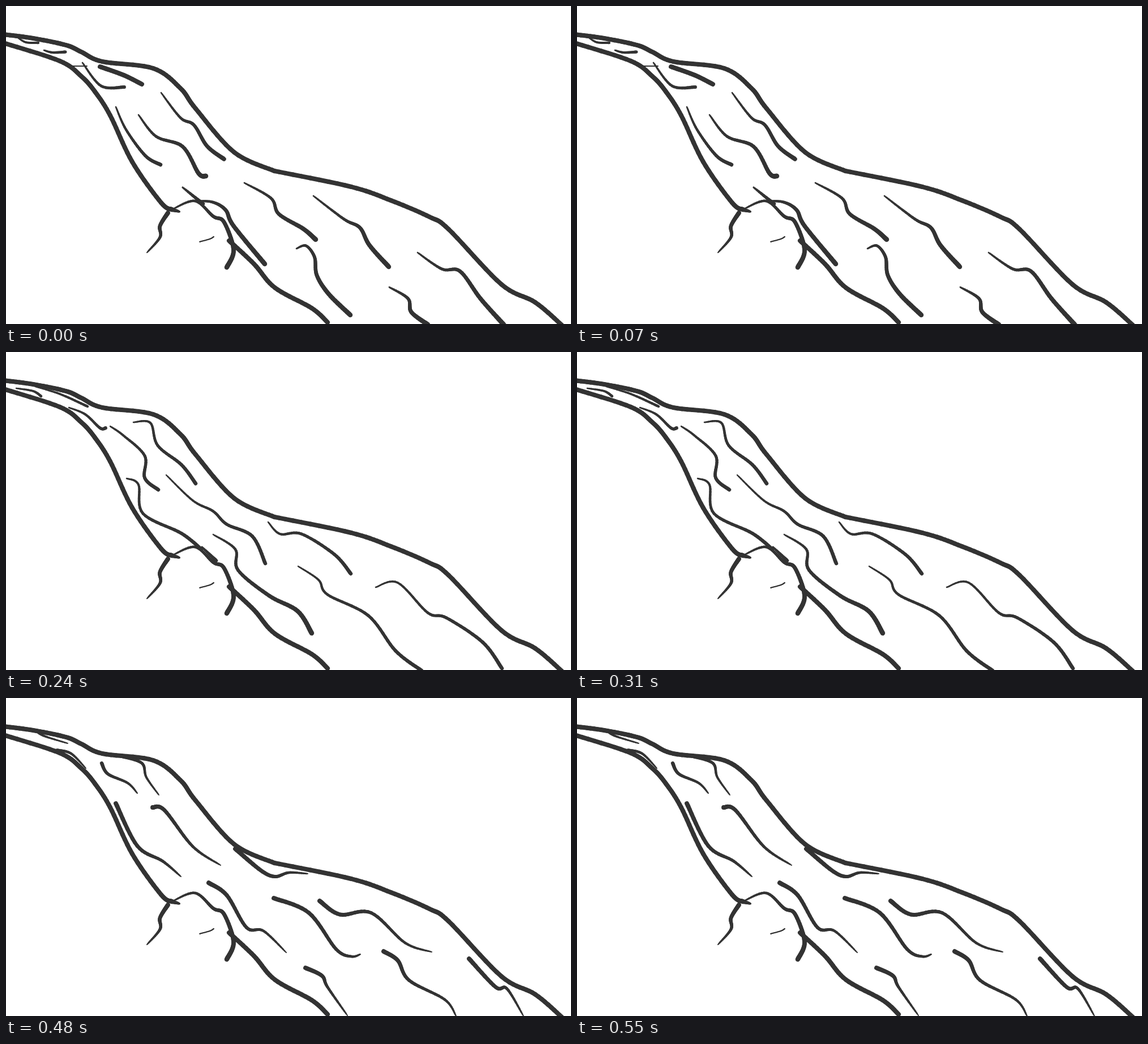
Write an HTML page with a canvas that moves like this. It is 998 by 561 pixels and loops after 0.6 s.

```html
<!DOCTYPE html>
<html lang="en">
<head>
<meta charset="utf-8">
<title>Flowing stream</title>
<style>
  html, body { margin: 0; width: 998px; height: 561px; overflow: hidden; background: #fff; }
  canvas { display: block; }
</style>
</head>
<body>
<canvas id="stage" width="998" height="561"></canvas>
<script>
const ctx = document.getElementById('stage').getContext('2d');
const HOLD = 120, STEPS = 10;

// Catmull-Rom value between b and c.
const spline = (a, b, c, d, t) =>
  b + t / 2 * (c - a + t * (2 * a - 5 * b + 4 * c - d + t * (3 * (b - c) + d - a)));

// Curve through x, y pairs; widthAt maps progress along it to the line width.
function brush(widthAt, coords) {
  const spans = coords.length / 2 - 1;
  const at = (i, k) => coords[2 * Math.max(0, Math.min(spans, i)) + k];
  let from = coords.slice(0, 2);
  for (let n = 1; n <= spans * STEPS; n++) {
    const i = Math.floor((n - 1) / STEPS), t = n / STEPS - i;
    const to = [0, 1].map(k => spline(at(i - 1, k), at(i, k), at(i + 1, k), at(i + 2, k), t));
    ctx.lineWidth = widthAt(n / (spans * STEPS));
    ctx.beginPath();
    ctx.moveTo(...from);
    ctx.lineTo(...to);
    ctx.stroke();
    from = to;
  }
}

// Strokes get thicker downstream, where the water is nearer.
const fullWidth = (y, limit) => Math.min(limit, 2.5 + y / 30);
const grow = (t, full) => 2 + (full - 2) * t ** 0.6;

const even = (...p) => brush(() => 8, p);
const fine = (...p) => brush(() => 2, p);
const swell = (...p) => brush(t => grow(t, fullWidth(p[1], 8.5)), p);
const slim = (...p) => brush(t => grow(t, fullWidth(p[1], 6.5)), p);
const taper = (...p) => brush(t => grow(1 - t, fullWidth(p[1], 8)), p);

function drawUpperBank() {
  even(-5, 50, 48, 57, 106, 69, 133, 81, 170, 98, 260, 110, 308, 145, 335, 181, 403, 258, 474, 291);
  even(474, 291, 610, 319, 680, 343, 748, 372, 782, 394, 875, 491, 935, 523, 984, 565);
}

function drawLowerBank() {
  even(-5, 65, 95, 97, 133, 124, 157, 151, 184, 193, 223, 275, 274, 347, 293, 359);
  taper(293, 359, 307, 363);
  even(394, 414, 438, 455, 475, 497, 540, 533, 568, 558);
}

function drawRock() {
  swell(295, 358, 334, 344, 366, 371, 385, 381, 402, 430, 390, 461);
  taper(286, 365, 272, 388, 272, 408, 249, 435);
  fine(342, 416, 360, 411, 367, 407);
}

function ripplesA() {
  swell(20, 55, 35, 64, 57, 65);
  swell(67, 78, 82, 82, 105, 81);
  fine(118, 106, 143, 106);
  swell(135, 100, 168, 141, 209, 143);
  even(166, 107, 208, 122, 240, 138);
  slim(194, 178, 212, 218, 246, 264, 273, 280);
  swell(234, 192, 265, 230, 312, 248, 340, 295, 353, 300);
  swell(274, 153, 308, 197, 332, 210, 355, 247, 385, 270);
  swell(421, 312, 468, 339, 482, 367, 525, 393, 547, 412);
  swell(543, 335, 597, 376, 625, 391, 642, 422, 676, 460);
  swell(513, 428, 530, 423, 545, 443, 549, 475, 570, 508, 608, 545);
  swell(727, 435, 770, 464, 802, 468, 838, 516, 880, 563);
  swell(677, 496, 710, 516, 716, 540, 745, 562);
  slim(312, 320, 348, 349);
  swell(334, 344, 365, 346, 388, 360, 402, 388, 457, 455);
}

function ripplesB() {
  swell(46, 76, 70, 79, 96, 87);
  swell(74, 66, 90, 77, 125, 80, 188, 118);
  swell(118, 101, 154, 116, 165, 135, 181, 136);
  slim(247, 122, 264, 130, 276, 174, 320, 203, 350, 240, 367, 247);
  swell(226, 165, 241, 180, 256, 229, 300, 240, 322, 260);
  swell(273, 278, 293, 310, 360, 353, 405, 380, 435, 440, 466, 455);
  swell(355, 267, 390, 298, 436, 318, 475, 365, 508, 386);
  swell(428, 360, 470, 411, 516, 421, 563, 500, 624, 563);
  swell(516, 321, 558, 347, 578, 352, 602, 400, 643, 435);
  swell(697, 411, 750, 457, 785, 458, 830, 480, 857, 528, 877, 562);
  swell(613, 451, 625, 464, 665, 485, 700, 527, 740, 562);
}

function ripplesC() {
  slim(18, 64, 48, 69, 62, 78);
  slim(52, 61, 95, 74, 144, 96);
  slim(111, 98, 140, 110, 166, 134, 176, 134);
  slim(184, 131, 207, 147, 245, 183, 245, 222, 269, 243);
  slim(225, 124, 255, 125, 268, 165, 310, 199, 335, 232);
  slim(283, 217, 330, 262, 366, 281, 390, 304, 435, 325, 458, 373);
  slim(213, 223, 234, 234, 242, 285, 310, 320, 345, 348);
  slim(346, 344, 371, 368);
  swell(366, 322, 405, 348, 410, 385, 465, 430, 515, 457, 540, 496);
  slim(463, 300, 484, 321, 522, 321, 580, 357, 609, 391);
  slim(516, 378, 552, 402, 568, 428, 640, 465, 688, 527, 734, 562);
  slim(653, 415, 692, 407, 745, 460, 778, 469, 842, 512, 876, 558);
}

function ripplesD() {
  taper(0, 58, 24, 67, 40, 67);
  taper(60, 62, 85, 73, 105, 75);
  taper(95, 99, 120, 99, 161, 131);
  taper(192, 110, 245, 121, 255, 150, 289, 189);
  taper(178, 126, 210, 152, 234, 168, 245, 214);
  taper(208, 206, 228, 248, 256, 285, 310, 322, 324, 343);
  taper(260, 202, 285, 230, 310, 237, 364, 287, 410, 314);
  taper(435, 302, 475, 322, 512, 313, 587, 345);
  taper(373, 332, 410, 358, 414, 388, 450, 421, 504, 453);
  taper(528, 379, 590, 444, 645, 470, 664, 492);
  taper(628, 391, 660, 394, 705, 435, 755, 452, 795, 477);
  taper(701, 482, 738, 522, 765, 528, 796, 561);
  taper(875, 512, 897, 523, 921, 561);
  taper(599, 543, 608, 560);
}

function ripplesE() {
  taper(57, 61, 70, 68, 109, 80);
  taper(90, 92, 115, 98, 141, 124);
  taper(169, 115, 180, 134, 215, 150, 232, 168);
  taper(205, 103, 240, 115, 248, 140, 270, 171);
  taper(259, 193, 280, 198, 330, 262, 379, 295);
  taper(194, 186, 232, 261, 277, 288, 309, 315);
  taper(405, 266, 450, 304, 475, 315, 500, 308, 533, 310);
  taper(358, 326, 390, 348, 425, 405, 455, 411, 495, 449);
  taper(473, 353, 535, 379, 583, 443, 610, 456, 626, 452);
  taper(554, 358, 590, 382, 645, 379, 705, 432, 752, 448);
  taper(667, 447, 692, 463, 712, 498, 775, 532, 795, 561);
  taper(529, 476, 558, 490, 568, 510, 603, 560);
  taper(818, 460, 865, 510, 885, 513, 914, 561);
}

const poses = [ripplesA, ripplesB, ripplesC, ripplesD, ripplesE];

function render() {
  ctx.fillStyle = '#fff';
  ctx.fillRect(0, 0, 998, 561);
  ctx.strokeStyle = '#333';
  ctx.lineCap = 'round';
  drawUpperBank();
  drawLowerBank();
  drawRock();
  poses[Math.floor(performance.now() / HOLD) % poses.length]();
  requestAnimationFrame(render);
}
render();
</script>
</body>
</html>
```
